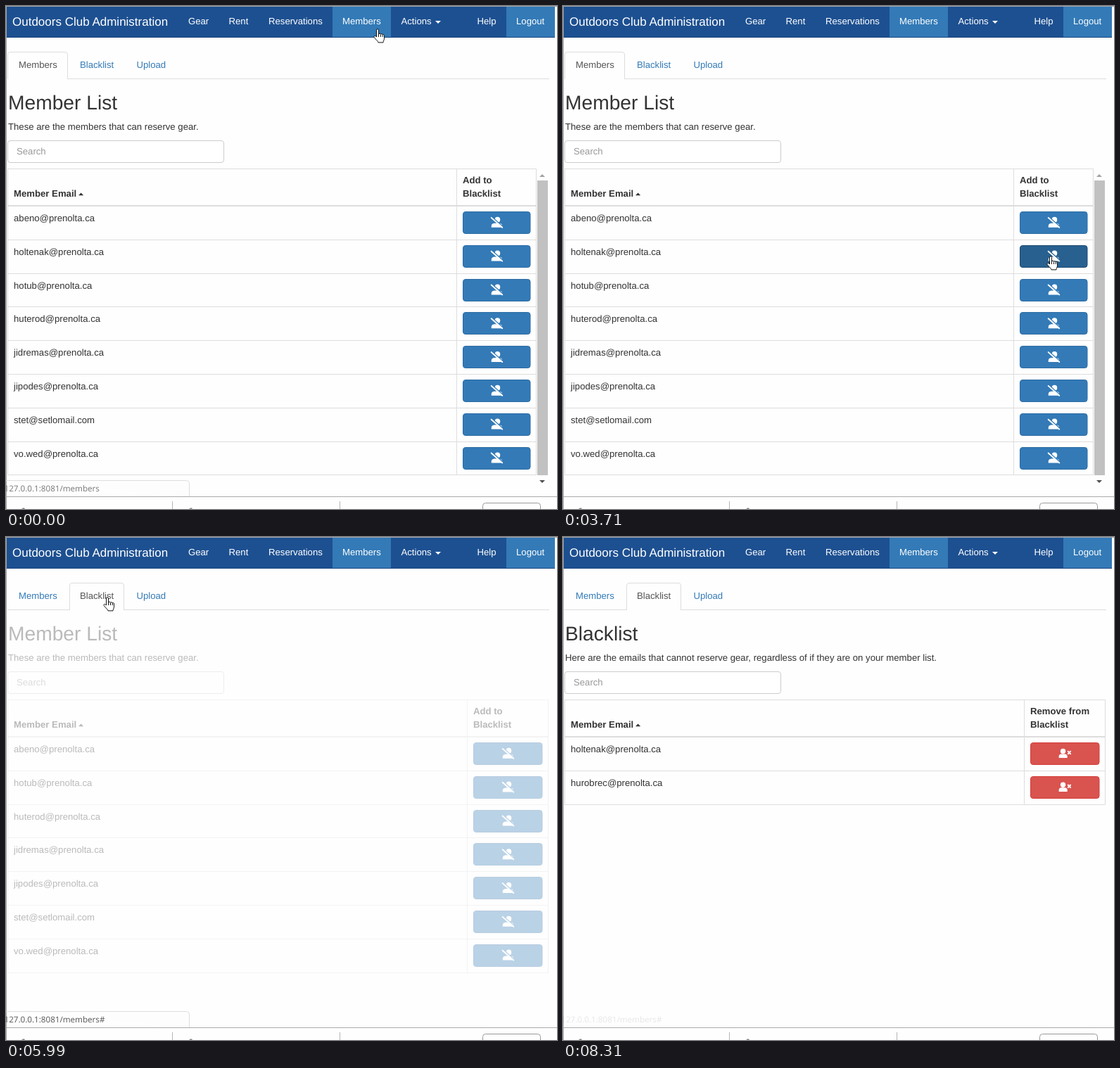
An HTML page that plays this animation: 783x715 px, repeating every 8.41 s.

```html
<!DOCTYPE html>
<html lang="en">
<head>
<meta charset="utf-8">
<title>Member administration</title>
<style>
html, body { margin: 0; width: 100%; height: 100%; overflow: hidden; background: #fefefe; }
svg { display: block; width: 783px; height: 715px; font: 13.16px "Liberation Sans", Arial, sans-serif; fill: #333; text-rendering: geometricPrecision; }
.line { fill: none; stroke: #ddd; }
.nav { fill: #fff; }
.link { fill: #337ab7; }
.bold { font-weight: bold; }
.btn { color: #337ab7; stroke: #2e6da4; }
.btn.red { color: #d9534f; stroke: #d43f3a; }
.btn.hot { color: #286090; stroke: #204d74; }
.btn.down { color: #204d74; stroke: #122b40; }
.icon { fill: #fff; stroke: none; }
.status { font: 11.65px "Open Sans", "Noto Sans", sans-serif; fill: #777; }
</style>
</head>
<body>
<svg id="stage" viewBox="0 0 783 715" xmlns="http://www.w3.org/2000/svg"></svg>
<script>
const LOOP = 8410;
const HOST = '@prenolta.ca';
const members = ['abeno', 'holtenak', 'hotub', 'huterod', 'jidremas', 'jipodes']
  .map(n => n + HOST).concat('stet@setlomail.com', 'vo.wed' + HOST);
const banned = ['holtenak' + HOST, 'hurobrec' + HOST];

const TICKS = [0,
  530, 680, 800, 950, 1070, 1220, 1340, 1490,
  1610, 1760, 1880, 2030, 2180, 2300, 2450, 2600,
  2750, 2870, 3020, 3140, 3290, 3410, 3560, 3710,
  4110, 4230, 4350,
  4940, 5060, 5210, 5330, 5450, 5600, 5720, 5840,
  5990, 6110, 6260, 6510, 6630, 6780, 6900, 7020,
  7140, 7260, 7410, 7530, 7650, 7800, 7920, 8040, 8190, 8310];

// pointer path: time, x, y
const PATH = [[400, 528, 33], [1490, 170, 297], [2030, 64, 363], [2600, 183, 362],
  [3710, 693, 356], [4810, 693, 356], [5450, 191, 108], [5840, 144, 86],
  [6380, 144, 86], [7020, 212, 337], [7920, 755, 706], [8040, 830, 757]];

const TABS = [['Members', 2, 88, 18], ['Blacklist', 90, 168, 105], ['Upload', 171, 243, 185.5]];
const ROW = 47.8, TOP = 284;

const text = (x, y, s, cls = '', extra = '') => `<text x="${x}" y="${y}" class="${cls}" ${extra}>${s}</text>`;
const rect = (x, y, w, h, extra = '') => `<rect x="${x}" y="${y}" width="${w}" height="${h}" ${extra}/>`;
const line = d => `<path class="line" d="${d}"/>`;
const rowY = i => Math.round(TOP + ROW * i);

const slashIcon = `<ellipse cx="1.2" cy="-4" rx="3.8" ry="4"/>
  <path d="M-7.5 7V5.2Q-7.5 1.4-3.4 1H4Q8 1.4 8 5.2V7z"/>
  <path d="M-6.8-7.9L9.2 6.3" stroke="currentColor" stroke-width="1.7"/>
  <path d="M-7.6-6.9L8 7" stroke="#fff" stroke-width="1.9" stroke-linecap="round"/>`;
const crossIcon = `<circle cx="-2.7" cy="-3.3" r="3.7"/>
  <path d="M-8.6 6.3V4Q-8.6.8-5 .6H-.4Q3.4.8 3.4 4V6.3z"/>
  <path d="M4-3.6L8.4 1M8.4-3.6L4 1" stroke="#fff" stroke-width="1.9"/>`;

function button(x, w, i, icon, cls) {
  const y = TOP + 8.5 + ROW * i;
  return `<g class="btn ${cls}">${rect(x + .5, Math.floor(y) + .5, w - 1, 31, 'rx="3.5" fill="currentColor"')}
    <g class="icon" transform="translate(${x + w / 2} ${y + 15.3})">${icon}</g></g>`;
}

function panel(id, title, note, rows, col, right, head, icon, cls = '') {
  const end = rowY(rows.length) + .5;
  let s = text(3, 147, title, '', 'font-size="28.2"') + text(3, 176, note);
  s += rect(2.5, 191.5, 307, 31, 'rx="3.5" fill="#fff" stroke="#ccc"') + text(15, 211, 'Search', '', 'fill="#999"');
  s += line(`M2.5 231.5H${right}V${end}H2.5zM${col} 231V${end}`);
  s += rect(2, TOP - 1, right - 2, 2, 'fill="#ddd"');
  s += text(11, 271, 'Member Email', 'bold') + '<path d="M103 269.2l3.6-3.6 3.6 3.6z"/>';
  s += text(col + 8.5, 252, head, 'bold') + text(col + 8.5, 271, 'Blacklist', 'bold');
  rows.forEach((mail, i) => {
    if (i) s += line(`M2 ${rowY(i) + .5}H${right}`);
    s += text(11, 306 + ROW * i, mail) + button(col + 8.5, right - col - 16.5, i, icon, cls);
  });
  return `<g id="${id}">${s}</g>`;
}

function build() {
  const note = 'These are the members that can reserve gear.';
  const rest = members.filter(m => !banned.includes(m));
  let s = rect(0, 0, 783, 715, 'fill="#fefefe"');
  s += rect(1, 1, 779, 44, 'fill="#1d5091"') + rect(464, 1, 83, 44, 'fill="#337ab7"') + rect(711, 1, 69, 44, 'fill="#337ab7"');
  s += rect(1, 44, 779, 1, 'fill="#1b4880"');
  s += text(9, 27.5, 'Outdoors Club Administration', 'nav', 'font-size="17"');
  [[259, 'Gear'], [316.5, 'Rent'], [373, 'Reservations'], [478, 'Members'], [561.5, 'Actions'], [669.5, 'Help'], [725, 'Logout']]
    .forEach(([x, label]) => s += text(x, 26, label, 'nav'));
  s += '<path class="nav" d="M610 21h8l-4 4z"/>';
  s += line('M2 103.5H772');
  TABS.forEach(([label, a, b, x], i) => {
    s += `<path id="tab${i}" d="M${a + .5} 104V69q0-3.5 3.5-3.5H${b - 4}q3.5 0 3.5 3.5V104"/>` + text(x, 88, label, 'link', `id="label${i}"`);
  });
  s += panel('full', 'Member List', note, members, 640.5, 753.5, 'Add to', slashIcon);
  s += panel('less', 'Member List', note, rest, 655.5, 770.5, 'Add to', slashIcon);
  s += panel('black', 'Blacklist', 'Here are the emails that cannot reserve gear, regardless of if they are on your member list.',
    banned, 655.5, 770.5, 'Remove from', crossIcon, 'red');
  s += `<g id="scroll">${rect(755, 248, 15, 419, 'fill="#c1c1c1"')}
    <path fill="#a3a3a3" d="M758 243h8l-4-4z"/><path fill="#505050" d="M758 674h8l-4 4z"/></g>`;
  // window edges and the bar below the page
  s += rect(0, 697, 783, 1, 'fill="#aaa"') + rect(0, 0, 1, 715, 'fill="#a6a6a6"') + rect(0, 0, 783, 1, 'fill="#a6a6a6"');
  s += rect(236, 704, 1, 11, 'fill="#b5b5b5"') + rect(474, 704, 1, 11, 'fill="#b5b5b5"');
  s += rect(677.5, 706.5, 82, 30, 'rx="4" fill="#fefefe" stroke="#999"');
  s += '<path fill="#888" d="M22 715l2-1.5h2l1 1.5zM260 715l2-1.5h2l1 1.5z"/>';
  s += '<path id="bubble" d="M0 674.5H256.5q4 0 4 4V697" fill="#fdfdfd" stroke="#ddd"/>' + text(-2.5, 690, '', 'status', 'id="status"');
  s += '<path id="pointer" fill="#fff" stroke="#111" stroke-linejoin="round"/>';
  document.getElementById('stage').innerHTML = s;
}

const SHAPES = {
  arrow: 'M.5.5V14l3.1-2.9 2.1 5 2.2-1-2.1-4.6H10z',
  hand: 'M-1.5 11V1.2a1.5 1.5 0 0 1 3 0V7c.3-1.2 2.7-1.2 3 .3.5-1 2.6-.8 2.8.6.6-.8 2.2-.5 2.2 1v4c0 3-1.5 3.6-1.5 6H1c0-2-3.5-3.8-5.8-7.5-.9-1.5 1-2.8 2.3-1.4zM1.5 7v4M4.5 7.5V11M7.3 8v3',
  beam: 'M-3-8h2L0-7 1-8h2M0-7V7M-3 8h2L0 7 1 8h2'
};

function pointerAt(t) {
  const i = PATH.findIndex(k => k[0] > t);
  if (i === 0) return PATH[0].slice(1);
  if (i < 0) return PATH[PATH.length - 1].slice(1);
  const [t0, x0, y0] = PATH[i - 1], [t1, x1, y1] = PATH[i];
  const u = (t - t0) / (t1 - t0);
  const e = (u + u * u * (3 - 2 * u)) / 2;
  return [x0 + (x1 - x0) * e, y0 + (y1 - y0) * e];
}

// opacity of the status bubble and of its text
function statusAt(t) {
  if (t < 1220) return [1, 1];
  if (t < 1340) return [0, .2];
  if (t < 5840) return [0, 0];
  if (t < 5990) return [0, .2];
  if (t < 8190) return [1, 1];
  return t < 8310 ? [.4, .5] : [0, .17];
}

build();
const $ = id => document.getElementById(id);
const set = (id, attrs) => { for (const k in attrs) $(id).setAttribute(k, attrs[k]); };
const buttons = {};
for (const id of ['full', 'less', 'black']) buttons[id] = [...$(id).querySelectorAll('.btn')];

function render(time) {
  const t = TICKS.filter(k => k <= time).pop();
  const [x, y] = pointerAt(t);
  const view = t < 4230 ? 'full' : t < 6110 ? 'less' : 'black';
  const fade = t === 5990 ? .33 : t === 6110 ? .5 : 1;
  for (const id in buttons) set(id, { display: id === view ? 'inline' : 'none', opacity: fade });
  set('scroll', { display: view === 'full' ? 'inline' : 'none' });

  const active = t < 5990 ? 0 : 1;
  const over = y > 65 && y < 104 ? TABS.findIndex(([, a, b]) => x >= a && x < b) : -1;
  TABS.forEach((_, i) => {
    const on = i === active, hot = i === over;
    set('tab' + i, { fill: on ? '#fefefe' : hot ? '#eee' : 'none', stroke: on ? '#ddd' : hot ? '#eee' : 'none' });
    $('label' + i).style.fill = on ? '#555' : '';
  });

  const [left, right] = view === 'full' ? [649, 745] : [664, 763];
  const row = Math.floor((y - TOP) / ROW), inRow = (y - TOP) - row * ROW;
  const hit = x >= left && x <= right && inRow > 8 && inRow < 41 ? row : -1;
  buttons[view].forEach((b, i) => {
    b.classList.toggle('hot', i === hit);
    b.classList.toggle('down', i === hit && t === 4110);
  });

  const kind = y < 45 || over >= 0 || buttons[view][hit] ? 'hand' : y > 191 && y < 223 && x < 310 ? 'beam' : 'arrow';
  set('pointer', { d: SHAPES[kind], transform: `translate(${x.toFixed(1)} ${y.toFixed(1)})` });

  const [box, ink] = statusAt(t);
  set('bubble', { opacity: box });
  set('status', { opacity: ink });
  $('status').style.fill = t === 5990 ? '#555' : '';
  $('status').textContent = '127.0.0.1:8081/members' + (t < 5000 ? '' : '#');
}

const start = performance.now();
function loop() {
  render((performance.now() - start) % LOOP);
  requestAnimationFrame(loop);
}
loop();
</script>
</body>
</html>
```
